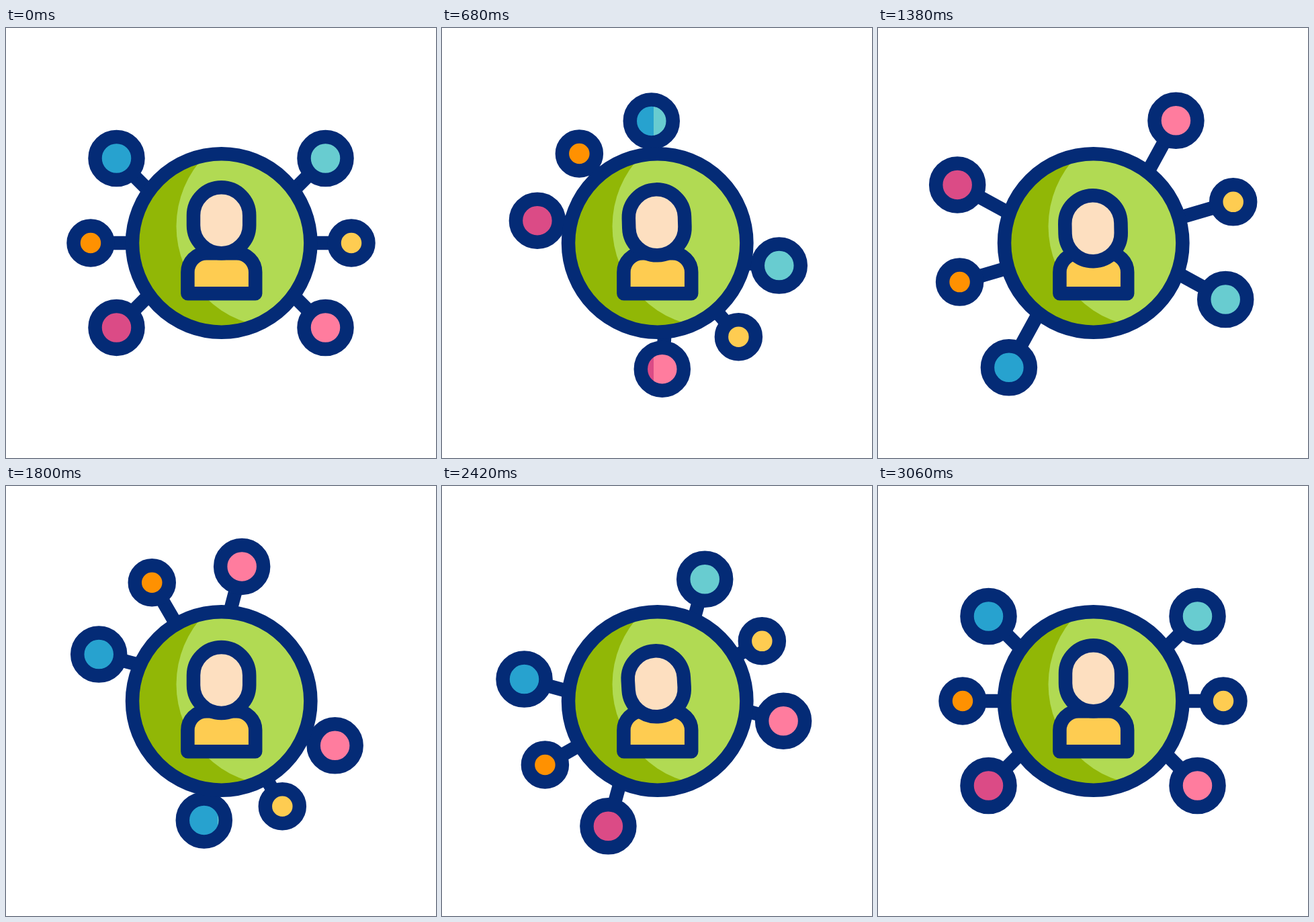
These frames come from a looping animation (640x640 px, 3.6 s). An HTML page with a canvas:

```html
<!DOCTYPE html>
<html lang="en">
<head>
<meta charset="utf-8">
<title>Network</title>
<style>
html, body { margin: 0; height: 100%; overflow: hidden; background: #fff; }
canvas { display: block; width: 640px; height: 640px; }
</style>
</head>
<body>
<canvas width="640" height="640"></canvas>
<script>
const ctx = document.querySelector('canvas').getContext('2d');
const LOOP = 3600, SPIN = 2940, STAGGER = 75, MID = 320, SPLIT = 315;
const NAVY = '#042b76', LINE = 20.5;

const BLUE = ['#27a2cf', '#68ccd0'];
const ROSE = ['#db4b86', '#ff7c9e'];
const GOLD = ['#ff9101', '#fecc51'];

// Rest offset from the centre, radius and dark/light colours, in order of delay
const nodes = [
  [-155.5, -126, 32, BLUE],
  [-155.5, 126, 32, ROSE],
  [-194, 0, 25.5, GOLD],
  [155.5, -126, 32, BLUE],
  [155.5, 126, 32, ROSE],
  [194, 0, 25.5, GOLD]
];

// Keys are [time, value], eased between neighbours
const pulse = [[0, 0], [640, -19.2], [1190, 24], [1830, -21.3], [2380, 0]];
const headShift = [[0, 0], [560, 6], [1020, -11.3], [1400, 12], [1860, 2.3], [2400, 8], [3060, 0]];
const headTilt = [[0, 0], [600, -3], [1020, 10], [1400, -1.2], [1800, 0], [2420, -3.4], [3060, 0]];

const ease = u => u * u * (3 - 2 * u);
const rad = deg => deg * Math.PI / 180;

function track(keys, t) {
  if (t <= keys[0][0]) return keys[0][1];
  for (let i = 1; i < keys.length; i++) {
    const [t0, a] = keys[i - 1], [t1, b] = keys[i];
    if (t < t1) return a + (b - a) * ease((t - t0) / (t1 - t0));
  }
  return keys[keys.length - 1][1];
}

function circle(x, y, r) {
  ctx.beginPath();
  ctx.arc(x, y, r, 0, 2 * Math.PI);
}

function paint(fill) {
  ctx.fillStyle = fill;
  ctx.fill();
  ctx.stroke();
}

// Dark shade left of the split line, light shade right of it
function splitFill([dark, light]) {
  const g = ctx.createLinearGradient(SPLIT - 1, 0, SPLIT + 1, 0);
  g.addColorStop(0.4, dark);
  g.addColorStop(0.6, light);
  return g;
}

function drawNode([x, y, r, shades], push, turn) {
  const dx = Math.sign(x), dy = Math.sign(y), len = Math.hypot(dx, dy);
  const place = s => {
    const px = x + s * dx / len, py = y + s * dy / len;
    return [
      MID + px * Math.cos(turn) - py * Math.sin(turn),
      MID + px * Math.sin(turn) + py * Math.cos(turn)
    ];
  };
  const hub = place(push);
  ctx.beginPath();
  ctx.moveTo(...hub);
  ctx.lineTo(...place(push - 88));
  ctx.stroke();
  circle(...hub, r);
  paint(splitFill(shades));
}

function drawDisc() {
  ctx.save();
  circle(320.7, 320, 132.7);
  ctx.fillStyle = '#91b706';
  ctx.fill();
  ctx.clip();
  circle(404, 295, 150.5);
  ctx.fillStyle = '#b1da53';
  ctx.fill();
  ctx.restore();
  circle(320.7, 320, 132.7);
  ctx.stroke();
}

function drawPerson(t) {
  ctx.beginPath();
  ctx.roundRect(270.4, 335.3, 100.8, 60, [28, 28, 0, 0]);
  paint('#fecc51');

  ctx.save();
  ctx.translate(320.6, 318 + track(headShift, t));
  ctx.rotate(rad(track(headTilt, t)));
  ctx.beginPath();
  ctx.roundRect(-41.6, -80.7, 83.2, 98, 41.6);
  paint('#fddfc0');
  ctx.restore();
}

function draw(t) {
  ctx.fillStyle = '#fff';
  ctx.fillRect(0, 0, 640, 640);
  ctx.strokeStyle = NAVY;
  ctx.lineWidth = LINE;
  ctx.lineJoin = 'round';
  const turn = rad(360 * ease(Math.min(t / SPIN, 1)));
  nodes.forEach((node, i) => drawNode(node, track(pulse, t - i * STAGGER), turn));
  drawDisc();
  drawPerson(t);
}

const start = performance.now();
function tick() {
  draw((performance.now() - start) % LOOP);
  requestAnimationFrame(tick);
}
tick();
</script>
</body>
</html>
```
